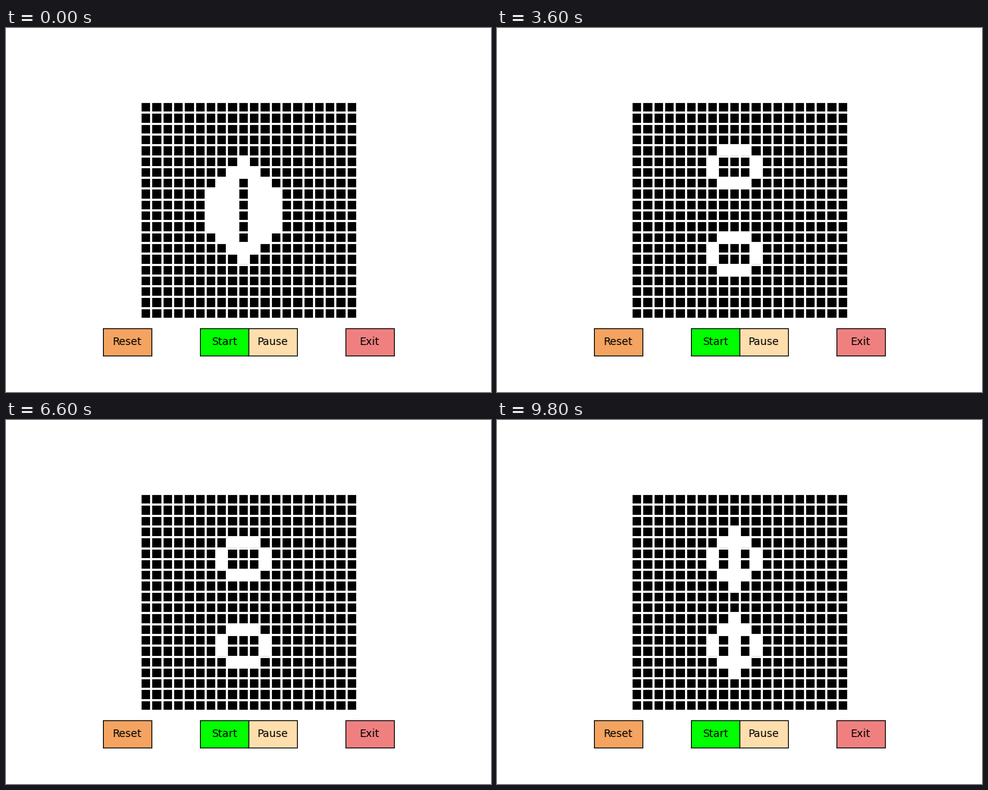
Animation of 640 by 480 pixels, one loop 10000 ms. Source, as a matplotlib script:

```python
import numpy as np
import matplotlib.pyplot as plt
from matplotlib.animation import FuncAnimation

WIDTH, HEIGHT = 640, 480
N = 20        # cells per side
SIDE = 286    # board size in pixels
FRAMES, INTERVAL = 50, 200

BUTTONS = [
    ("Reset", 0.2, "sandybrown"),
    ("Start", 0.4, "lime"),
    ("Pause", 0.5, "navajowhite"),
    ("Exit", 0.7, "lightcoral"),
]


def seed_board():
    """One phase of the pentadecathlon, a period 15 oscillator."""
    board = np.zeros((N, N), dtype=int)
    for row, reach in enumerate([0, 1, 2, 3, 3, 3, 3, 2, 1, 0], start=5):
        board[row, 9 - reach:10 + reach] = 1
    board[7:13, 9] = 0
    return board


def step(board):
    around = sum(
        np.roll(board, (dy, dx), (0, 1))
        for dy in (-1, 0, 1) for dx in (-1, 0, 1) if dy or dx
    )
    return ((around == 3) | ((board == 1) & (around == 2))).astype(int)


def add_board(fig, board):
    """Live cells white, dead cells black, with white lines between them."""
    w, h = SIDE / WIDTH, SIDE / HEIGHT
    ax = fig.add_axes([(1 - w) / 2, (1 - h) / 2, w, h])
    image = ax.imshow(board, cmap="gray", vmin=0, vmax=1,
                      interpolation="nearest")
    lines = np.arange(N + 1) - 0.5
    ax.set(xticks=lines, yticks=lines)
    ax.tick_params(length=0, labelbottom=False, labelleft=False)
    ax.grid(color="white", linewidth=2)
    ax.spines[:].set_visible(False)
    return image


def add_button(fig, label, left, color):
    ax = fig.add_axes([left, 0.1, 0.1, 0.075], facecolor=color)
    ax.set(xticks=[], yticks=[])
    ax.text(0.5, 0.5, label, ha="center", va="center", fontsize=10,
            family="DejaVu Sans", transform=ax.transAxes)


boards = [seed_board()]
while len(boards) < FRAMES:
    boards.append(step(boards[-1]))

fig = plt.figure(figsize=(WIDTH / 100, HEIGHT / 100), dpi=100,
                 facecolor="white")
image = add_board(fig, boards[0])
for button in BUTTONS:
    add_button(fig, *button)


def update(frame):
    image.set_data(boards[frame])
    return [image]


anim = FuncAnimation(fig, update, frames=FRAMES, interval=INTERVAL,
                     repeat=True, repeat_delay=0)
plt.show()
```
